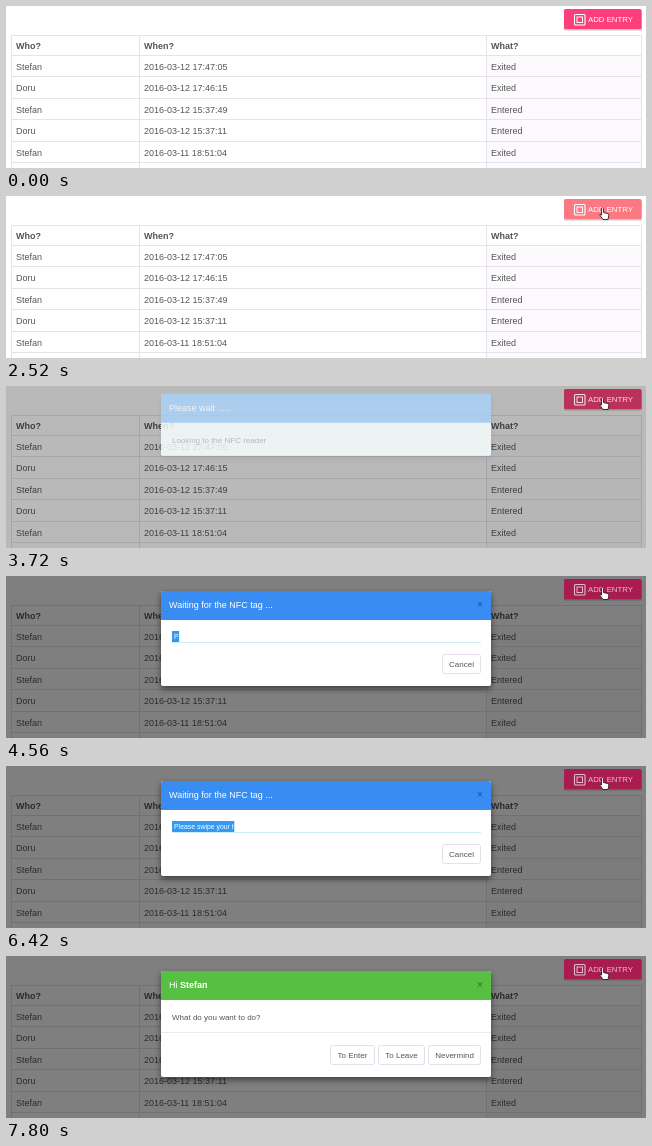
Write an HTML page that moves like this. It is 640 px wide and 162 px high and loops after 8000 ms.

```html
<!DOCTYPE html>
<html lang="en">
<head>
<meta charset="utf-8">
<title>Entry log</title>
<style>
html, body { margin: 0; width: 100%; height: 100%; overflow: hidden; background: #fff; }
svg { display: block; width: 100%; height: 100%; font: 9px "Liberation Sans", Arial, sans-serif; fill: #555; }
text { white-space: pre; }
.bold { font-weight: bold; }
.small { font-size: 8px; }
.title { fill: #fff; }
</style>
</head>
<body>
<svg id="stage" viewBox="0 0 640 162" xmlns="http://www.w3.org/2000/svg">
  <defs>
    <filter id="glow" x="-10%" y="-20%" width="120%" height="150%">
      <feGaussianBlur stdDeviation="3"/>
    </filter>
  </defs>
  <rect width="640" height="162" fill="#fff"/>
  <g id="table"></g>
  <rect id="dim" width="640" height="162" fill="#000"/>
  <g id="button">
    <rect x="558" y="4.5" width="78" height="20" rx="1.5" fill="#000" opacity=".22"/>
    <rect id="face" x="558" y="3" width="77.5" height="20" rx="1.5"/>
    <g id="label">
      <g fill="none" stroke="#fff">
        <rect x="568.5" y="8.5" width="10.5" height="10.5" rx="1" stroke-width="1.1"/>
        <rect x="571" y="11" width="5.5" height="5.5"/>
      </g>
      <text x="582" y="16" font-size="7.8" fill="#fff">ADD ENTRY</text>
    </g>
  </g>
  <g id="dialogs"></g>
  <g id="cursor" fill="#fff" stroke="#111" stroke-width=".8" stroke-linejoin="round">
    <path id="arrow" d="M0 0v9l2-2 1.5 3.3 1.4-.6-1.5-3.2h3z"/>
    <path id="hand" d="M0 1q1-1.6 2 0v4l4 1q1.5.4 1.3 2l-.8 4h-5l-3.3-4.6q0-1.4 1.8.1z"/>
  </g>
</svg>
<script>
const LOOP = 8000, TICK = 60;
const MESSAGE = "Please swipe your tag now.";
const $ = id => document.getElementById(id);
const set = (id, attrs) => {
  for (const name in attrs) $(id).setAttribute(name, attrs[name]);
};

// Linear interpolation through [time, value] pairs
function track(t, keys) {
  if (t <= keys[0][0]) return keys[0][1];
  for (let i = 1; i < keys.length; i++) {
    const [a, from] = keys[i - 1], [b, to] = keys[i];
    if (t <= b) return from + (to - from) * (t - a) / (b - a);
  }
  return keys[keys.length - 1][1];
}
const rgb = c => `rgb(${c.map(Math.round)})`;
const mix = (a, b, k) => a.map((v, i) => v + (b[i] - v) * k);

const label = (x, y, text, cls = "") => `<text x="${x}" y="${y}" class="${cls}">${text}</text>`;
const line = (x1, y1, x2, y2, color) =>
  `<line x1="${x1}" y1="${y1}" x2="${x2}" y2="${y2}" stroke="${color}"/>`;

function buildTable() {
  const columns = [10, 138, 485];
  const rows = [
    ["Stefan", "2016-03-12 17:47:05", "Exited"],
    ["Doru", "2016-03-12 17:46:15", "Exited"],
    ["Stefan", "2016-03-12 15:37:49", "Entered"],
    ["Doru", "2016-03-12 15:37:11", "Entered"],
    ["Stefan", "2016-03-11 18:51:04", "Exited"]
  ];
  const ink = "#e7e2ec";
  let out = `<rect x="481" y="50" width="155" height="112" fill="#fcfafc"/>` +
    line(5, 29.5, 636, 29.5, ink) + line(5, 49.5, 636, 49.5, ink);
  ["Who?", "When?", "What?"].forEach((s, i) => out += label(columns[i], 43, s, "bold"));
  rows.forEach((row, r) => {
    const top = 50 + r * 21.5, edge = Math.floor(top + 21.5) - .5;
    row.forEach((s, i) => out += label(columns[i], top + 13.5, s));
    out += line(5, edge, 636, edge, ink);
  });
  for (const x of [5.5, 133.5, 480.5, 635.5]) out += line(x, 29, x, 162, ink);
  $("table").innerHTML = out;
}

const button = (x, y, w, text) =>
  `<rect x="${x + .5}" y="${y + .5}" width="${w - 1}" height="19" rx="2" fill="#fff" stroke="#e6deea"/>
   <text x="${x + w / 2}" y="${y + 13}" class="small" text-anchor="middle">${text}</text>`;

function dialog(id, height, color, title, body, closable) {
  const cross = closable
    ? `<text x="474" y="31.5" font-size="11" text-anchor="middle" fill="#000" opacity=".4">×</text>` : "";
  return `<g id="${id}">
    <rect id="${id}Shadow" x="155" y="18" width="330" height="${height}" fill="#000" filter="url(#glow)"/>
    <rect x="155" y="15" width="330" height="${height}" rx="2" fill="#fff"/>
    <path d="M155 44V17q0-2 2-2H483q2 0 2 2V44z" fill="${color}"/>
    ${cross}${body}
    <rect id="${id}Veil" x="155" y="15" width="330" height="${height}" rx="2" fill="#f4ffff"/>
    ${label(163, 32, title, "title")}
  </g>`;
}

function buildDialogs() {
  const blue = "#398cf1", rule = "#e9e9ef";
  $("dialogs").innerHTML =
    dialog("wait", 62, blue, "Please wait .....",
      label(166, 64, "Looking to the NFC reader", "small"), false) +
    dialog("scan", 95, blue, "Waiting for the NFC tag ...",
      line(166, 66.5, 475, 66.5, "#cdeef5") +
      `<rect id="mark" x="166" y="55" height="11" fill="#3399f5"/>
       <text id="typed" x="168" y="63" font-size="6.9" style="fill:#fff"></text>` +
      button(436, 78, 39, "Cancel"), true) +
    dialog("greet", 106, "#57c043", 'Hi <tspan class="bold">Stefan</tspan>',
      label(166, 64, "What do you want to do?", "small") +
      line(155, 76.5, 485, 76.5, rule) +
      button(324, 89, 45, "To Enter") + button(372, 89, 47, "To Leave") +
      button(422, 89, 53, "Nevermind"), true);
}

function pose(id, p) {
  set(id, {
    display: p > 0 ? "inline" : "none",
    opacity: Math.min(1, p * 2.1),
    transform: `translate(0 ${-(1 - p) * 12})`
  });
  set(id + "Veil", { opacity: 1 - p });
  set(id + "Shadow", { opacity: .5 * p * p });
}

function drawBackdrop(t) {
  const d = track(t, [[2520, 0], [3000, 1], [3600, 1], [3660, .85], [3720, .55], [3780, .5],
    [3960, 1], [7260, 1], [7320, .85], [7380, .55], [7440, .5], [7680, 1]]);
  set("dim", { opacity: .5 * d });

  const hover = track(t, [[1920, 0], [2160, .85], [2460, .85], [2520, 1]]);
  const lit = mix([252, 63, 122], [251, 121, 130], hover);
  set("face", { fill: rgb(mix(lit, [168, 28, 79], Math.min(1, d * 1.4))) });
  set("label", { opacity: 1 - .3 * d });
}

function drawCursor(t) {
  const x = track(t, [[1140, 630], [1920, 599], [2160, 595.5]]);
  const y = track(t, [[1140, 157], [1920, 17], [2160, 11.5]]);
  const over = t >= 1980;
  set("cursor", { display: t >= 420 ? "inline" : "none", transform: `translate(${x} ${y})` });
  set("arrow", { display: over ? "none" : "inline" });
  set("hand", { display: over ? "inline" : "none" });
}

function drawTyping(t) {
  const count = t < 4560 ? 0 : Math.floor(track(t, [[4560, 1], [5040, 8], [5400, 8], [5460, 9],
    [5640, 13], [5940, 17], [6300, 17], [6360, 18], [6840, 26]]) + 1e-6);
  $("typed").textContent = MESSAGE.slice(0, count);
  set("mark", { width: count ? 2.5 + $("typed").getComputedTextLength() : 0 });
}

function draw(ms) {
  const t = Math.floor(ms % LOOP / TICK) * TICK;
  drawBackdrop(t);
  drawCursor(t);
  pose("wait", track(t, [[2580, 0], [2760, .45], [2940, .8], [3180, 1], [3600, 1], [3720, .4], [3780, 0]]));
  pose("scan", t < 7440
    ? track(t, [[3720, 0], [3840, .6], [3960, .93], [4020, 1], [7260, 1], [7380, .4], [7440, 0]]) : 0);
  pose("greet", track(t, [[7440, 0], [7560, .5], [7680, .85], [7800, 1]]));
  drawTyping(t);
}

buildTable();
buildDialogs();
const start = performance.now();
function frame() {
  draw(performance.now() - start);
  requestAnimationFrame(frame);
}
frame();
</script>
</body>
</html>
```
